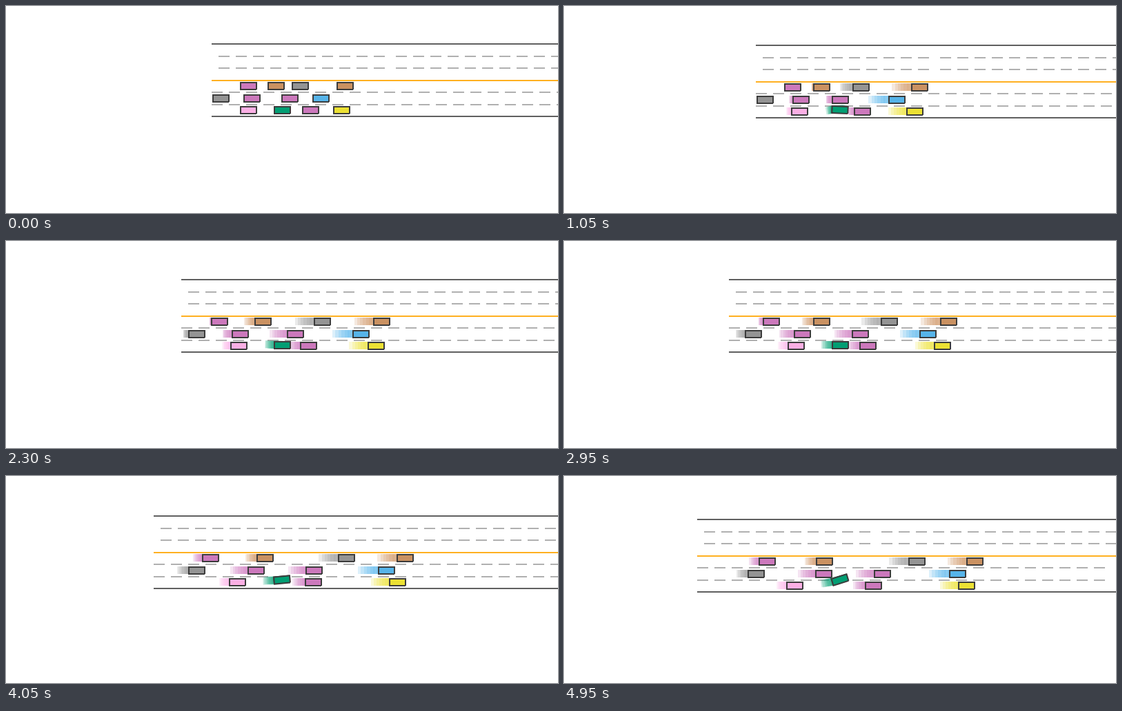
An HTML page with a canvas for the animation above (5000 ms loop, 800 by 300 pixels).

```html
<!DOCTYPE html>
<html lang="en">
<head>
<meta charset="utf-8">
<title>Highway traffic</title>
<style>
  html, body { margin: 0; width: 100%; height: 100%; overflow: hidden; background: #fff; }
  canvas { display: block; }
</style>
</head>
<body>
<canvas id="road" width="800" height="300"></canvas>
<script>
const ctx = document.getElementById('road').getContext('2d');
const LOOP = 5, FPS = 20;
const GHOSTS = 7, GHOST_GAP = 0.1, GHOST_ALPHA = 0.2;
const CAR_W = 25, CAR_H = 12, EGO_X = 388;
const LANES = [110, 128, 145];
const PURPLE = '#cc78bc', BROWN = '#ca9161', GREY = '#949494', BLUE = '#56b4e9',
      PINK = '#fbafe4', YELLOW = '#ece133', GREEN = '#029e73',
      OUTLINE = '#3c3c3c', EDGE = '#606060', DASH = '#b0b0b0', CENTRE = '#ffb020';

// Time elapsed since a soft start at t0, and a bell around a moment.
const ramp = (t, t0) => 0.3 * Math.log(1 + Math.exp((t - t0) / 0.3));
const bell = (t, mid, width) => Math.exp(-(((t - mid) / width) ** 2));

// The camera follows the green car: it brakes, then speeds up again.
const CAMERA = [[0, 298], [0.45, 284], [1.1, 277], [2.3, 254], [3.6, 224], [4.95, 193]];
function roadX(t) {
  const i = Math.max(1, CAMERA.findIndex(p => t <= p[0]));
  const [t0, x0] = CAMERA[i - 1], [t1, x1] = CAMERA[i];
  return x0 + (x1 - x0) * (t - t0) / (t1 - t0);
}

// A small swerve at first, a lane change at the end.
const roadY = t => 0.85 * (1 - Math.exp(-4 * t)) + 1.4 * bell(t, 0.75, 0.5)
                 + 7.4 * ramp(t, 3.97);
const heading = t => 3 * bell(t, 1.25, 0.5) - 9.3 * bell(t, 0.45, 0.27)
                   - 14.5 * ramp(t, 3.78);

// A car starts at x with the given speed and gains more around time t0.
const car = (lane, color, x, speed, gain = 0, t0 = 0) => ({
  y: LANES[lane], color,
  x: t => x + speed * t + gain * (ramp(t, t0) - ramp(0, t0))
});
const cars = [
  car(0, PURPLE, 41, 0, 21, 2.66),
  car(0, BROWN, 81, 0, 25, 1.31),
  car(0, GREY, 116, 8, 35, 0.61),
  car(0, BROWN, 181, 42.3),
  car(1, GREY, 1, 0, 25, 2.07),
  car(1, PURPLE, 46, 7, 31.5, 2.09),
  car(1, PURPLE, 101, 0, 39, 0.97),
  car(1, BLUE, 146, 44.2),
  car(2, PINK, 41, 9, 13, 1.6),
  car(2, PURPLE, 131, 6, 21, 1),
  car(2, YELLOW, 176, 40.9)
];

function rect(color, x, y, w, h) {
  ctx.fillStyle = color;
  ctx.fillRect(x, y, w, h);
}

function dashes(x, y, count) {
  for (let i = 0; i < count; i++) rect(DASH, x + 25 * i, y, 16, 2);
}

function drawRoad(x, y) {
  for (const row of [72, 89]) {
    dashes(x + 10, y + row, 10);
    dashes(x + 267, y + row, 24);
  }
  for (const row of [124, 142]) dashes(x, y + row, 24);
  rect(EDGE, x, y + 54, 800 - x, 2);
  rect(CENTRE, x, y + 107, 800 - x, 2);
  rect(EDGE, x, y + 159, 800 - x, 2);
}

function body(color, x, y) {
  rect(OUTLINE, x, y, CAR_W, CAR_H - 1);
  rect(OUTLINE, x, y, CAR_W - 1, CAR_H);
  rect(color, x + 2, y + 2, CAR_W - 4, CAR_H - 4);
}

const ghost = (color, x, y) => rect(color, x, y, CAR_W, CAR_H - 1);

// Calls draw for past moments, oldest first, in faint colour.
function trail(t, draw) {
  ctx.globalAlpha = GHOST_ALPHA;
  for (let k = GHOSTS - 1; k >= 0; k--) {
    const past = t - 1 / FPS - k * GHOST_GAP;
    if (past > -0.001) draw(Math.max(0, past));
  }
  ctx.globalAlpha = 1;
}

function turned(x, y, degrees, draw) {
  const flat = Math.abs(degrees) < 1;
  ctx.save();
  ctx.translate(x + (flat ? 12.5 : 12), y + (flat ? 151 : 150.5));
  if (!flat) ctx.rotate(degrees * Math.PI / 180);
  draw(GREEN, -CAR_W / 2, -CAR_H / 2);
  ctx.restore();
}

function drawEgo(t) {
  const x = roadX(t), y = roadY(t);
  trail(t, past => turned(Math.round(EGO_X + x - roadX(past)),
                          Math.round(y - roadY(past)), heading(past), ghost));
  turned(EGO_X, 0, heading(t), body);
}

function render(t) {
  const x = roadX(t), y = Math.round(roadY(t));
  rect('#fff', 0, 0, 800, 300);
  drawRoad(Math.round(x), y);
  for (const c of cars) {
    const at = time => Math.round(x + c.x(time));
    trail(t, past => ghost(c.color, at(past), y + c.y));
    body(c.color, at(t), y + c.y);
  }
  drawEgo(t);
}

const start = performance.now();
function tick() {
  const t = (performance.now() - start) / 1000 % LOOP;
  render(Math.floor(t * FPS) / FPS);
  requestAnimationFrame(tick);
}
tick();
</script>
</body>
</html>
```
